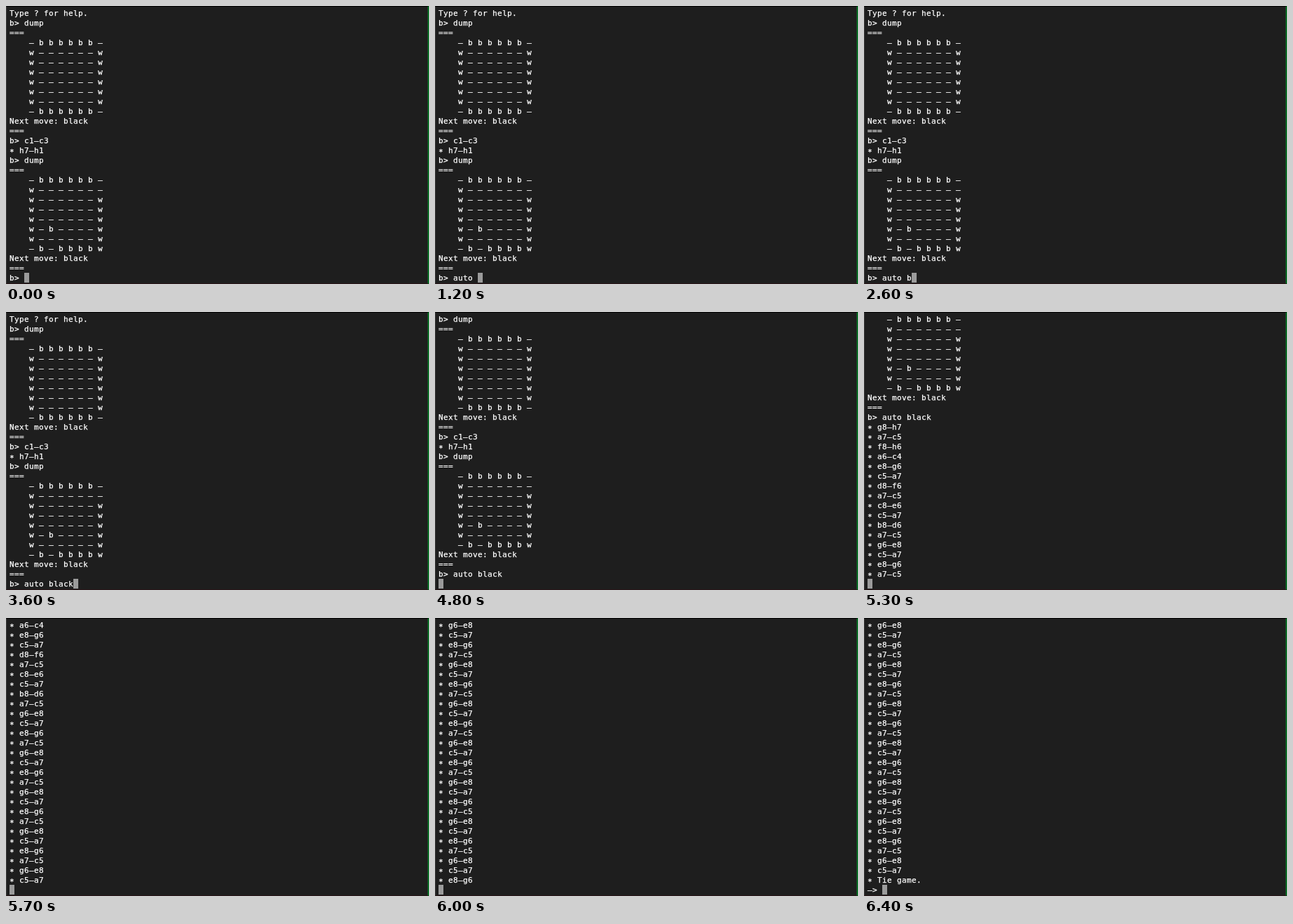
Recreate the animation shown at these times as an HTML page. Size 603 by 397 pixels, loop 8000 ms.

```html
<!DOCTYPE html>
<html lang="en">
<head>
<meta charset="utf-8">
<style>
html, body { margin: 0; width: 100%; height: 100%; overflow: hidden; background: #1e1e1e; }
body { position: relative; }
/* 11px face set on a 7px grid */
#screen {
  position: absolute; left: 5px; top: 4px; margin: 0; color: #fff;
  font: 11px/14px "DejaVu Sans Mono", monospace;
  letter-spacing: calc(7px - 1ch);
  -webkit-text-stroke: .25px #fff;
  font-variant-ligatures: none;
}
#cursor { position: absolute; width: 7px; height: 14px; background: #9b9b9b; }
#frame {
  position: absolute; inset: 0; border: 1px solid #3a3a3a;
  border-color: #000 #0a6a24 #2a1618 #3a3a3a; border-right-width: 2px;
}
</style>
</head>
<body>
<div id="frame"></div>
<div id="cursor"></div>
<pre id="screen"></pre>
<script>
const LOOP = 8000, ROWS = 28, CELL = 7, LINE = 14;
const screen = document.getElementById('screen');
const cursor = document.getElementById('cursor');

const board = rows => ['===', ...rows.map(r => '    ' + [...r].join(' ')), 'Next move: black', '==='];
const edge = '-bbbbbb-', side = 'w------w';
const history = [
  'Type ? for help.', 'b> dump',
  ...board([edge, ...Array(6).fill(side), edge]),
  'b> c1-c3', '* h7-h1', 'b> dump',
  ...board([edge, 'w-------', side, side, side, 'w-b----w', side, '-b-bbbbw'])
];

const command = 'auto black';
const keyTimes = [500, 600, 800, 1100, 1200, 2600, 3200, 3300, 3400, 3600];
const ENTER = 4800, END = 6400;
const opening = 'g8-h7 a7-c5 f8-h6 a6-c4 e8-g6 c5-a7 d8-f6 a7-c5 c8-e6 c5-a7 b8-d6 a7-c5'.split(' ');
const cycle = ['g6-e8', 'c5-a7', 'e8-g6', 'a7-c5'];
// moves printed after each 100 ms since Enter
const printed = [0, 3, 6, 10, 13, 16, 18, 21, 24, 30, 33, 36, 39, 42];
const moves = Array.from({ length: 42 }, (_, i) => '* ' + (opening[i] || cycle[i % 4]));

function linesAt(t) {
  const typed = command.slice(0, keyTimes.filter(k => k <= t).length);
  const lines = [...history, 'b> ' + typed];
  if (t < ENTER) return lines;
  const step = Math.min(Math.floor((t - ENTER) / 100), printed.length - 1);
  lines.push(...moves.slice(0, printed[step]));
  if (t < END) lines.push('');
  else lines.push('* Tie game.', '-> ');
  return lines;
}

let shown;
function draw(now) {
  const lines = linesAt(now % LOOP).slice(-ROWS);
  // wide dash and centred star, as the terminal face draws them
  const text = lines.join('\n').replace(/-/g, '–').replace(/\*/g, '∗');
  if (text !== shown) {
    screen.textContent = shown = text;
    cursor.style.left = 5 + CELL * lines[lines.length - 1].length + 'px';
    cursor.style.top = 3 + LINE * (lines.length - 1) + 'px';
  }
  requestAnimationFrame(draw);
}
draw(performance.now());
</script>
</body>
</html>
```
